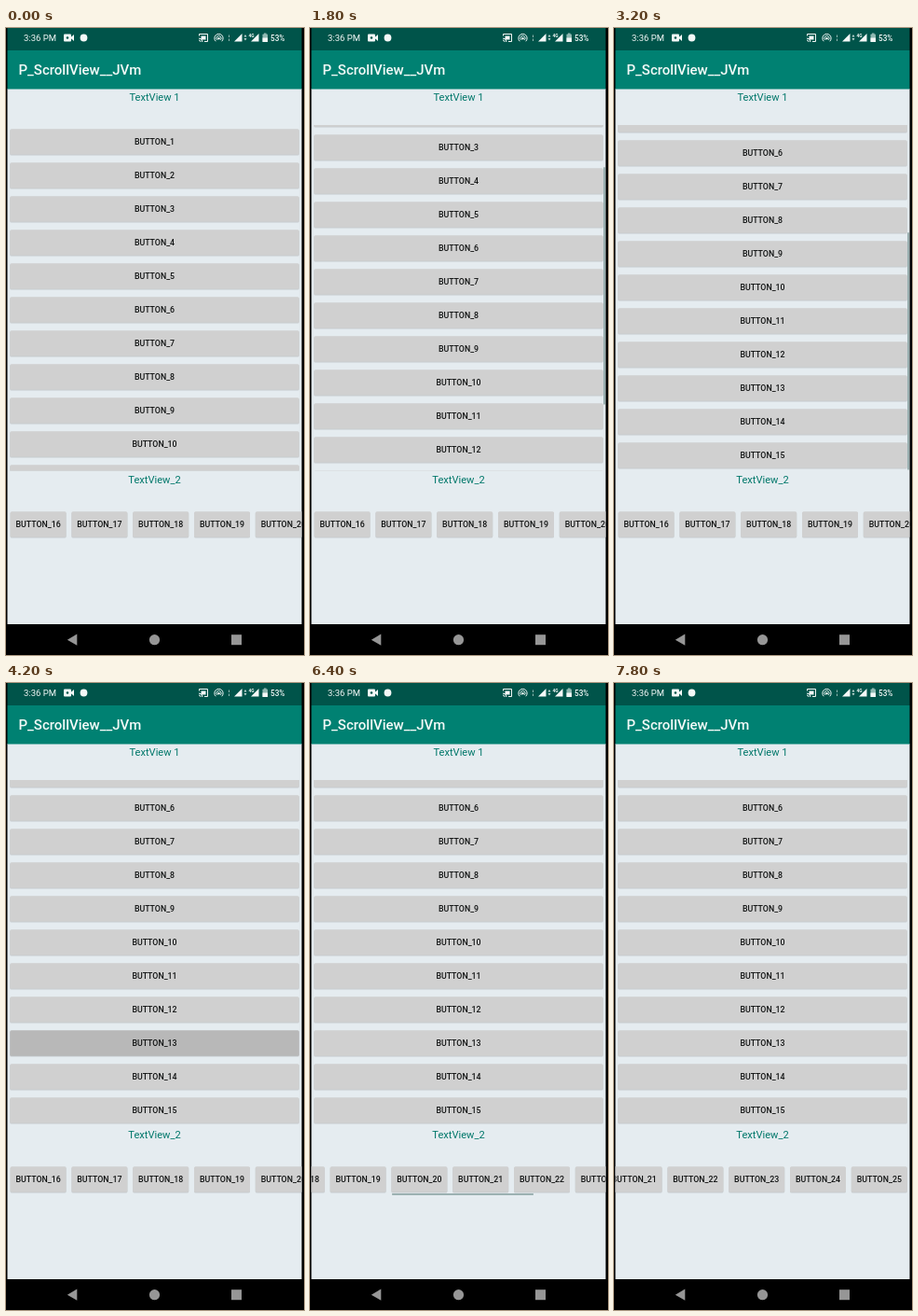
An HTML page with a canvas that plays this animation: 320 px wide and 672 px high, repeating every 8000 ms.

```html
<!DOCTYPE html>
<html lang="en">
<head>
<meta charset="utf-8">
<title>Scroll views</title>
<style>
html, body { margin: 0; width: 100%; height: 100%; overflow: hidden; background: #000; }
canvas { display: block; width: 320px; height: 672px; }
</style>
</head>
<body>
<canvas id="stage"></canvas>
<script>
const W = 320, H = 672, LOOP = 8000, STEP = 200;
const LEFT = 1.5, RIGHT = 317.5, MID = 159.5;
const TEAL = '#008172', INK = '#f4f8f7', DIM = '#8fb8b1';
const BAR = 'rgba(55,95,92,.42)';
const canvas = document.getElementById('stage');
const ctx = canvas.getContext('2d');
const ratio = window.devicePixelRatio || 1;
canvas.width = W * ratio;
canvas.height = H * ratio;

// [time, value] pairs
const SCROLL_Y = [[1000, 0], [1200, 4], [1800, 66], [2400, 128], [3000, 168]];
const SCROLL_X = [[5200, 0], [5600, 48], [6400, 180.4], [7200, 342]];
const BAR_Y = [[800, 0], [1000, 1], [3200, 1], [3600, 0]];
const BAR_X = [[5000, 0], [5200, 1], [7400, 1], [7600, 0]];
const PRESS = [[3800, 0], [4000, 0.6], [4200, 1], [4400, 0.6], [4600, 0]];

function track(keys, t) {
  if (t <= keys[0][0]) return keys[0][1];
  for (let i = 1; i < keys.length; i++) {
    const [t0, v0] = keys[i - 1], [t1, v1] = keys[i];
    if (t <= t1) return v0 + (v1 - v0) * (t - t0) / (t1 - t0);
  }
  return keys[keys.length - 1][1];
}

function rect(x, y, w, h, color) {
  ctx.fillStyle = color;
  ctx.fillRect(x, y, w, h);
}

function roundRect(x, y, w, h, r, color) {
  ctx.fillStyle = color;
  ctx.beginPath();
  ctx.moveTo(x + r, y);
  ctx.arcTo(x + w, y, x + w, y + h, r);
  ctx.arcTo(x + w, y + h, x, y + h, r);
  ctx.arcTo(x, y + h, x, y, r);
  ctx.arcTo(x, y, x + w, y, r);
  ctx.fill();
}

function poly(points, color) {
  ctx.fillStyle = color;
  ctx.beginPath();
  points.forEach(([x, y]) => ctx.lineTo(x, y));
  ctx.fill();
}

function dot(x, y, r, color) {
  ctx.fillStyle = color;
  ctx.beginPath();
  ctx.arc(x, y, r, 0, Math.PI * 2);
  ctx.fill();
}

function arc(x, y, r, from, to, width) {
  ctx.lineWidth = width;
  ctx.beginPath();
  ctx.arc(x, y, r, from * Math.PI, to * Math.PI);
  ctx.stroke();
}

function text(str, x, y, size, weight, color, align = 'left') {
  ctx.font = `${weight} ${size}px Roboto, sans-serif`;
  ctx.textAlign = align;
  ctx.fillStyle = color;
  ctx.fillText(str, x, y);
}

function clipped(x, y, w, h, draw) {
  ctx.save();
  ctx.beginPath();
  ctx.rect(x, y, w, h);
  ctx.clip();
  draw();
  ctx.restore();
}

function button(n, cx, cy, w, press = 0) {
  const x = cx - w / 2, y = cy - 13.8, h = 27.6;
  const shade = Math.round(208 - 24 * press);
  roundRect(x, y + 0.8, w, h, 1.5, 'rgba(0,0,0,.14)');
  roundRect(x, y, w, h, 1.5, `rgb(${shade},${shade},${shade})`);
  text('BUTTON_' + n, cx, cy + 3.1, 8.8, 500, '#101212', 'center');
}

function statusBar() {
  rect(LEFT, 0, RIGHT - LEFT, 24, '#00544a');
  text('3:36 PM', 19, 14, 9.5, 400, INK);

  // camera
  roundRect(62, 6.5, 8, 8, 1, INK);
  poly([[69, 10.5], [73, 7], [73, 14]], INK);
  dot(66, 10.5, 1.3, '#00544a');

  dot(83.5, 10.5, 3.9, INK);

  // cast
  ctx.strokeStyle = INK;
  ctx.lineWidth = 1;
  ctx.beginPath();
  ctx.moveTo(207.5, 8.5);
  ctx.lineTo(207.5, 6.5);
  ctx.lineTo(216.5, 6.5);
  ctx.lineTo(216.5, 14.5);
  ctx.lineTo(213, 14.5);
  ctx.stroke();
  rect(209.5, 8.5, 5, 4, INK);
  arc(207, 15, 2, 1.5, 2, 1);
  arc(207, 15, 4, 1.5, 2, 1);

  // hotspot
  arc(228.5, 11, 4.6, 0.75, 2.25, 1);
  arc(228.5, 11, 2.6, 0.75, 2.25, 0.9);
  dot(228.5, 11.3, 1.2, INK);

  // link, signals and battery
  rect(239, 7.5, 1, 2.5, DIM);
  rect(239, 11.5, 1, 2.5, DIM);
  poly([[245, 14.5], [253.5, 14.5], [253.5, 6]], INK);
  poly([[255.5, 9.5], [257, 7], [258.5, 9.5]], '#c4dad6');
  poly([[255.5, 11], [257, 13.5], [258.5, 11]], '#c4dad6');
  text('4G', 260.5, 9.8, 4.8, 700, INK);
  poly([[263, 14.5], [271.5, 14.5], [271.5, 6]], INK);
  rect(277, 5.5, 2.5, 1.5, DIM);
  roundRect(275.5, 6.5, 5.5, 8.5, 0.8, DIM);
  rect(275.5, 10.5, 5.5, 4.5, INK);
  text('53%', 284, 13.8, 8.2, 500, INK);
}

function navBar() {
  const grey = '#969696';
  poly([[65.8, 655.7], [76.3, 649.6], [76.3, 661.8]], grey);
  dot(159.5, 655.7, 5.6, grey);
  rect(242, 650.2, 11, 11, grey);
}

function verticalList(t) {
  const offset = track(SCROLL_Y, t);
  const top = 104, height = 370.5;
  clipped(LEFT, top, RIGHT - LEFT, height, () => {
    for (let n = 1; n <= 15; n++) {
      const y = 122 + (n - 1) * 36 - offset;
      button(n, MID, y, 310.5, n === 13 ? track(PRESS, t) : 0);
    }
    const scale = height / 540;
    ctx.globalAlpha = track(BAR_Y, t);
    rect(RIGHT - 2.5, top + offset * scale, 2.5, height * scale, BAR);
  });
}

function horizontalList(t) {
  const offset = track(SCROLL_X, t);
  const width = RIGHT - LEFT, pitch = 65.8;
  clipped(LEFT, 510, width, 40, () => {
    for (let n = 16; n <= 25; n++) {
      button(n, 34.6 + (n - 16) * pitch - offset, 532, 60);
    }
    const scale = width / (pitch * 10);
    ctx.globalAlpha = track(BAR_X, t);
    rect(LEFT + offset * scale, 547, width * scale, 2, BAR);
  });
}

function draw(t) {
  ctx.setTransform(ratio, 0, 0, ratio, 0, 0);
  rect(0, 0, W, H, '#000');
  rect(LEFT, 65, RIGHT - LEFT, 574, '#e5ecf0');
  rect(LEFT, 24, RIGHT - LEFT, 41.5, TEAL);
  statusBar();
  text('P_ScrollView__JVm', 13.5, 50, 15, 500, '#f4faf8');
  text('TextView 1', MID, 78, 11.1, 400, '#00776a', 'center');
  text('TextView_2', MID, 487.8, 11.1, 400, '#00776a', 'center');
  verticalList(t);
  horizontalList(t);
  navBar();
}

const start = performance.now();
function tick() {
  const t = (performance.now() - start) % LOOP;
  draw(Math.floor(t / STEP) * STEP);
  requestAnimationFrame(tick);
}
tick();
</script>
</body>
</html>
```
